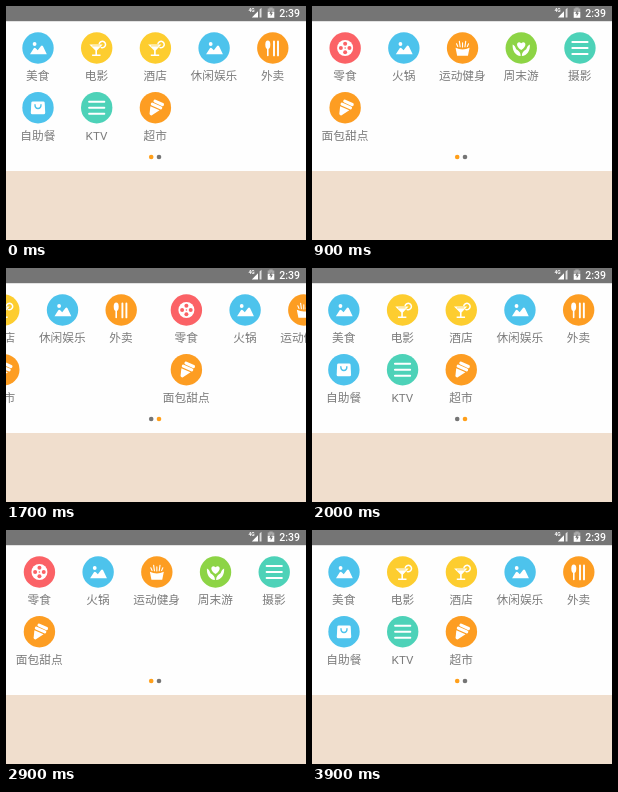
These frames come from a looping animation (300 px wide and 234 px high, 4300 ms). An HTML page with a canvas:

```html
<!DOCTYPE html>
<html lang="zh">
<head>
<meta charset="utf-8">
<style>
html, body { margin: 0; width: 100%; height: 100%; overflow: hidden; background: #fff; }
canvas { display: block; width: 300px; height: 234px; }
</style>
</head>
<body>
<canvas id="stage"></canvas>
<script>
const W = 300, H = 234, LOOP = 4300, STEP = 100;
const canvas = document.getElementById('stage');
const ratio = window.devicePixelRatio || 1;
canvas.width = W * ratio;
canvas.height = H * ratio;
const ctx = canvas.getContext('2d');

const BLUE = '#4dc3ec', YELLOW = '#fdcd2f', ORANGE = '#fd9d22',
      TEAL = '#4dd2b8', RED = '#fb6266', GREEN = '#8dd445', GRAY = '#757575';

function disc(x, y, r, color) {
  ctx.fillStyle = color;
  ctx.beginPath();
  ctx.arc(x, y, r, 0, Math.PI * 2);
  ctx.fill();
}

function shape(path, color = '#fff') {
  ctx.fillStyle = color;
  ctx.fill(new Path2D(path));
}

function line(path, width, color = '#fff') {
  ctx.strokeStyle = color;
  ctx.lineWidth = width;
  ctx.lineCap = ctx.lineJoin = 'round';
  ctx.stroke(new Path2D(path));
}

// Each glyph is drawn around the centre of its badge.
const glyphs = {
  picture() {
    disc(-3.4, -4, 1.9, '#fff');
    shape('M-8 6.2 L-4.2 .2 Q-3.3 -.8 -2.3 .2 L-.3 2.2 L3 -2 Q4 -3 5 -1.8 L8.8 6.2 Z');
  },
  cocktail() {
    line('M2.6 -4.4 A3.2 3.2 0 1 1 4.6 -.4', 1.5);
    shape('M-7.3 -3.6 H6 L.3 2.4 V6.6 H3.8 V8 H-4.6 V6.6 H-1.3 V2.4 Z');
    line('M-4 -2.1 H2.6', .7, YELLOW);
  },
  cutlery() {
    ctx.fillStyle = '#fff';
    ctx.beginPath();
    ctx.ellipse(-5, -3.2, 2.5, 4.2, 0, 0, Math.PI * 2);
    ctx.fill();
    line('M-5 0 V7.4', 1.6);
    line('M1.2 -6.6 V7.4 M5.2 -6.6 V7.4', 1.9);
  },
  bag() {
    shape('M-5.2 -6.3 H5.2 Q6.6 -6.3 6.7 -5 L7.2 5 Q7.2 6.5 5.7 6.5 H-5.7 Q-7.2 6.5 -7.2 5 L-6.7 -5 Q-6.6 -6.3 -5.2 -6.3 Z');
    line('M-3 -3 C-3 2 3 2 3 -3', 1.4, BLUE);
  },
  lines() {
    line('M-7.6 -6 H7.6 M-7.6 0 H7.6 M-7.6 6 H7.6', 2);
  },
  cone() {
    ctx.save();
    ctx.rotate(.6);
    line('M-4 -5.2 L4 -6.6', 3.2);
    line('M-4.6 -1.2 L4.6 -2.8', 3);
    shape('M-5 1.6 L4.9 -.2 L1.2 8.6 Q0 9.6 -1.2 8.6 Z');
    ctx.restore();
  },
  reel() {
    disc(0, 0, 8, '#fff');
    for (const [x, y] of [[0, -4.3], [4.3, 0], [0, 4.3], [-4.3, 0]]) disc(x, y, 2, RED);
    disc(0, 0, .8, RED);
  },
  fries() {
    line('M-6 -4.2 L-4.8 -1.6 M-3.2 -6.8 L-2.4 -1.2 M0 -5.2 V-1 M3.2 -6.8 L2.4 -1.2 M6 -4.2 L4.8 -1.6', 1.1);
    shape('M-7 -.2 Q-3.5 1.6 0 1.6 Q3.5 1.6 7 -.2 L5.4 7.8 H-5.4 Z');
  },
  hands() {
    shape('M-8.6 -3.6 C-9 3 -6 7.2 -.6 8 C-.4 4.6 -2.4 2.8 -5 1.2 C-5.8 -1 -6.8 -3 -8.6 -3.6 Z');
    shape('M8.6 -3.6 C9 3 6 7.2 .6 8 C.4 4.6 2.4 2.8 5 1.2 C5.8 -1 6.8 -3 8.6 -3.6 Z');
    shape('M0 2 C-7.4 -2.8 -3.4 -8.2 0 -4.8 C3.4 -8.2 7.4 -2.8 0 2 Z');
  }
};

const pages = [
  [
    ['美食', BLUE, 'picture'], ['电影', YELLOW, 'cocktail'], ['酒店', YELLOW, 'cocktail'],
    ['休闲娱乐', BLUE, 'picture'], ['外卖', ORANGE, 'cutlery'],
    ['自助餐', BLUE, 'bag'], ['KTV', TEAL, 'lines'], ['超市', ORANGE, 'cone']
  ],
  [
    ['零食', RED, 'reel'], ['火锅', BLUE, 'picture'], ['运动健身', ORANGE, 'fries'],
    ['周末游', GREEN, 'hands'], ['摄影', TEAL, 'lines'],
    ['面包甜点', ORANGE, 'cone']
  ]
];

// A drag from `first` to `pulled` px, then a decelerating snap to the next page.
const swipes = [
  { start: 600,  first: 12.5, pulled: 110, release: 60,  snap: 375, dot: 1100, to: 1 },
  { start: 1500, first: 8,    pulled: 148.4, release: 200, snap: 400, dot: 2100, to: 0 },
  { start: 2600, first: 48,   pulled: 130, release: 60,  snap: 390, dot: 3100, to: 1 },
  { start: 3300, first: 16.3, pulled: 140, release: 160, snap: 420, dot: 3900, to: 0 }
];

function travel(s, t) {
  if (t < s.release) return s.first + (s.pulled - s.first) * Math.pow(t / s.release, 1.3);
  const left = Math.max(0, 1 - (t - s.release) / s.snap);
  return W - (W - s.pulled) * Math.pow(left, 5);
}

function stateAt(t) {
  let offset = 0, active = 0;
  for (const s of swipes) {
    if (t >= s.start) {
      const d = travel(s, t - s.start);
      offset = s.to ? d : W - d;
    }
    if (t >= s.dot) active = s.to;
  }
  return { offset, active };
}

function drawItem([label, color, glyph], x, y) {
  if (x < -30 || x > W + 30) return;
  disc(x, y, 15.7, color);
  ctx.save();
  ctx.translate(x, y);
  glyphs[glyph]();
  ctx.restore();
  ctx.fillStyle = '#7c7c7c';
  ctx.textAlign = 'center';
  ctx.font = '11.7px Roboto, "Noto Sans CJK SC", "Noto Sans CJK", sans-serif';
  ctx.fillText(label, x - .2, y + 31.8);
}

function drawStatus() {
  ctx.fillStyle = GRAY;
  ctx.fillRect(0, 0, W, 15.2);
  ctx.fillStyle = '#fff';
  ctx.textAlign = 'left';
  ctx.font = '500 10.5px Roboto, sans-serif';
  ctx.fillText('2:39', 273.2, 10.8);
  ctx.font = '700 5px Roboto, sans-serif';
  ctx.fillText('4G', 242.5, 6);
  shape('M245.8 11.5 L252 5.3 V11.5 Z');
  shape('M253.6 3.6 L255.5 1.8 V11.5 H253.6 Z', '#e0e0e0');
  shape('M263.3 1.5 H266.7 V2.6 H268.3 V6 H261.7 V2.6 H263.3 Z', '#a9a9a9');
  shape('M261.7 6 H268.3 V11.8 H261.7 Z');
  shape('M265.5 3.8 L263.2 7.8 H264.7 V10.6 L266.9 6.7 H265.5 Z', GRAY);
}

function draw(t) {
  const { offset, active } = stateAt(t);
  ctx.setTransform(ratio, 0, 0, ratio, 0, 0);
  ctx.fillStyle = '#fefefe';
  ctx.fillRect(0, 0, W, H);
  pages.forEach((items, p) => items.forEach((item, i) => {
    const x = 32 + (i % 5) * 58.7 + p * W - offset;
    drawItem(item, x, 42 + Math.floor(i / 5) * 59.7);
  }));
  for (let i = 0; i < 2; i++) disc(145.2 + i * 7.8, 151, 2.3, i === active ? '#ff9f1a' : GRAY);
  ctx.fillStyle = '#f0decd';
  ctx.fillRect(0, 165, W, H - 165);
  drawStatus();
}

const began = performance.now();
function tick() {
  const t = (performance.now() - began) % LOOP;
  draw(Math.floor(t / STEP) * STEP);
  requestAnimationFrame(tick);
}
tick();
</script>
</body>
</html>
```
